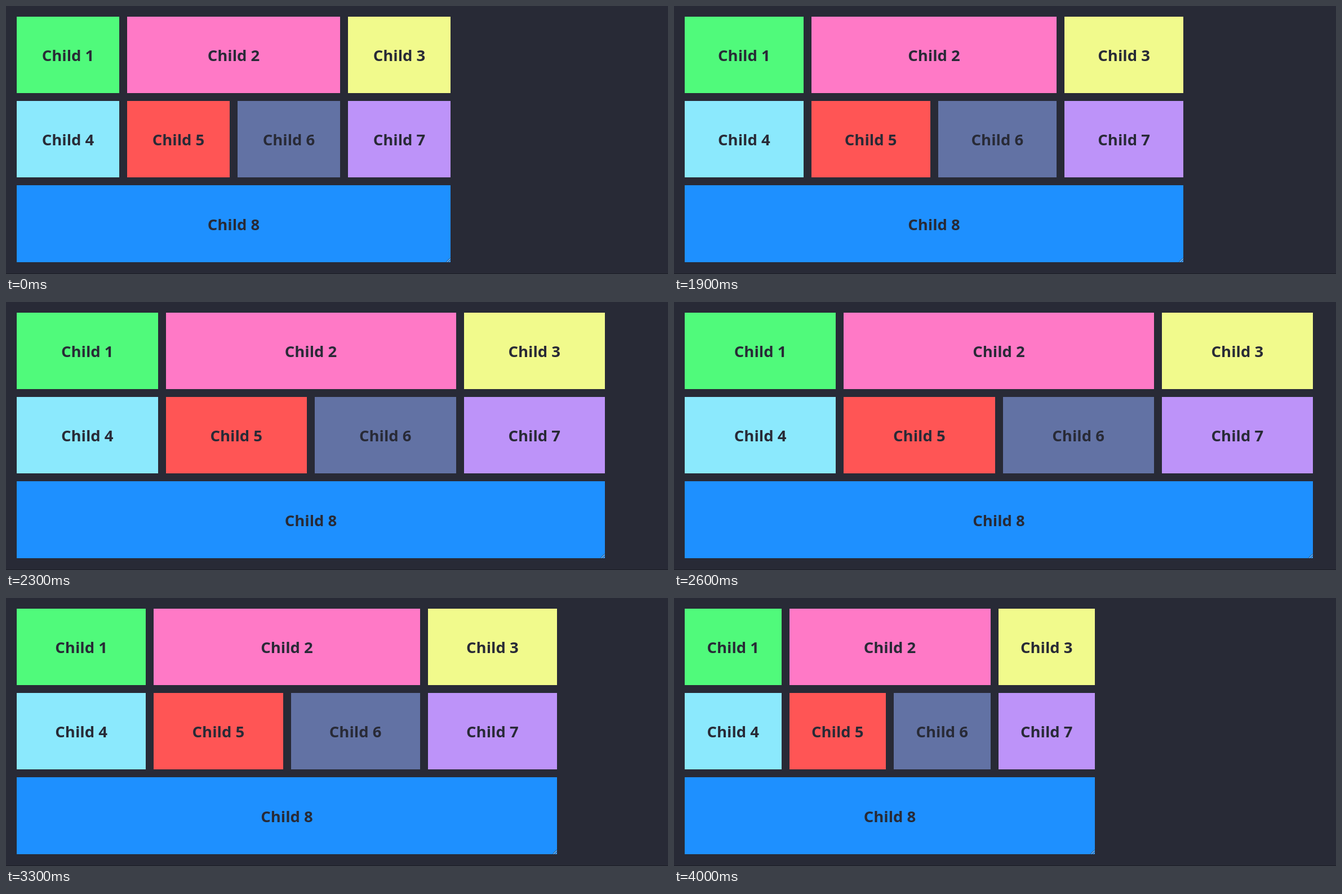
An HTML page that plays this animation: 1175x477 px, repeating every 4900 ms.

```html
<!DOCTYPE html>
<html lang="en">
<head>
<meta charset="utf-8">
<title>Resizable grid</title>
<style>
  html, body { margin: 0; width: 100%; height: 100%; overflow: hidden; background: #282a36; }
  #grid {
    position: absolute; left: 19px; top: 18.6px; width: 770px; height: 437px;
    display: grid; gap: 14px;
    grid-template-columns: repeat(4, 1fr);
    grid-template-rows: repeat(3, 1fr);
  }
  #grid div {
    display: flex; align-items: center; justify-content: center;
    box-sizing: border-box; padding-top: 2px;
    color: #282a36; white-space: nowrap;
    font: bold 27.5px/1.36 "Open Sans", "Noto Sans", sans-serif;
  }
  #grid div:nth-child(2) { grid-column: span 2; }
  #grid div:nth-child(8) { grid-column: span 4; }
  #handle { position: absolute; right: 0; bottom: 0; fill: none; }
  #edge { position: absolute; left: 0; right: 0; top: 476px; height: 1px; background: #1c1d26; }
</style>
</head>
<body>
<div id="grid">
  <div style="background:#50fa7b">Child 1</div>
  <div style="background:#ff79c6">Child 2</div>
  <div style="background:#f1fa8c">Child 3</div>
  <div style="background:#8be9fd">Child 4</div>
  <div style="background:#ff5555">Child 5</div>
  <div style="background:#6272a4">Child 6</div>
  <div style="background:#bd93f9">Child 7</div>
  <div style="background:#1e90ff">Child 8</div>
  <svg id="handle" width="9" height="9">
    <path d="M2.5 8.5 8.5 2.5M6.5 8.5 8.5 6.5" stroke="#b9d8f5"/>
    <path d="M1.5 8.5 8.5 1.5M5.5 8.5 8.5 5.5" stroke="#24405f"/>
  </svg>
</div>
<div id="edge"></div>
<script>
  const LOOP = 4900, STEP = 100, DRAG_START = 1500, LEFT = 19, REST = 789;
  // Right edge of the grid at every step of the drag: out, short pause, back.
  const drag = [
    790.3, 800, 826, 863, 904, 946, 987, 1027, 1063, 1094, 1118, 1134, 1141, 1143, 1143,
    1132, 1105, 1048, 978, 918, 873, 840, 810, 785, 764, 747
  ];
  const grid = document.getElementById('grid');

  function rightEdge(time) {
    if (time < DRAG_START) return REST;
    const step = Math.floor((time - DRAG_START) / STEP);
    return drag[Math.min(step, drag.length - 1)];
  }

  function draw() {
    grid.style.width = rightEdge(performance.now() % LOOP) - LEFT + 'px';
    requestAnimationFrame(draw);
  }
  draw();
</script>
</body>
</html>
```
